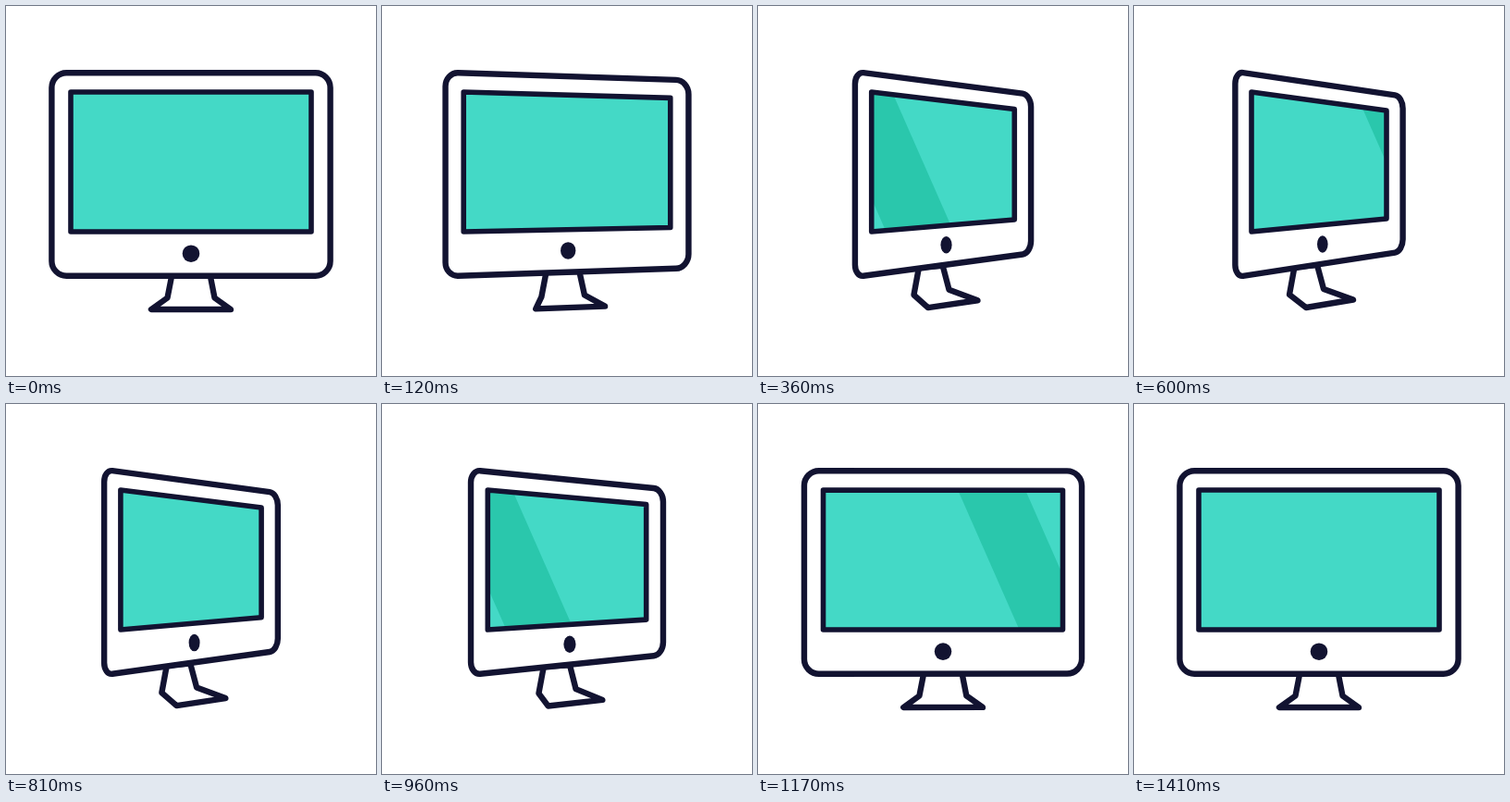
Recreate the animation shown at these times as an HTML page. Size 400 px wide and 400 px high, loop 3.62 s.

```html
<!DOCTYPE html>
<html lang="en">
<head>
<meta charset="utf-8">
<title>Turning monitor</title>
<style>
  html, body { margin: 0; width: 100%; height: 100%; overflow: hidden; background: #fff; }
  svg { display: block; width: 100%; height: 100%; }
  .line { fill: #fff; stroke: #121331; stroke-width: 6.4; stroke-linecap: round; stroke-linejoin: round; }
  #rim { fill: none; stroke-width: 5.6; }
  #glass { fill: #44d9c6; }
  .glare { fill: #2ac7ac; }
  #button { fill: #121331; }
</style>
</head>
<body>
<svg viewBox="0 0 400 400">
  <clipPath id="clip"><path id="mask"/></clipPath>
  <path id="stand" class="line"/>
  <path id="frame" class="line"/>
  <path id="glass"/>
  <g clip-path="url(#clip)">
    <path class="glare" d="M-15 60h73l88 200h-73z"/>
    <path class="glare" d="M-15 60h73l88 200h-73z"/>
  </g>
  <path id="rim" class="line"/>
  <ellipse id="button"/>
</svg>
<script>
const LOOP = 3620, STEP = 30, TURN = 600, SWEEP = 840, MID = 200;
const $ = id => document.getElementById(id);
const glares = document.querySelectorAll('.glare');

const mix = (a, b, k) => a + (b - a) * k;
const blend = (p, q, k) => p.map((v, i) => mix(v, q[i], k));
const poly = pts => 'M' + pts.join('L') + 'Z';
const set = (id, attrs) => {
  for (const name in attrs) $(id).setAttribute(name, attrs[name]);
};

// Half of the stand seen from the front, and the whole stand fully turned.
const leg = [[20.5, 290], [25.5, 315.5], [43, 328]];
const standFront = [
  ...leg.map(([x, y]) => [MID - x, y]),
  ...leg.map(([x, y]) => [MID + x, y]).reverse()
];
const standTurned = [[173.5, 282], [168, 312], [186, 326], [237, 317.5], [205, 306], [198, 280]];

// A centred panel whose sides close in while the right one shrinks.
function panel(half, top, bottom, squeeze, drop, rise, lift = 0) {
  const left = MID - half + squeeze, right = MID + half - squeeze;
  return [[left, top - lift], [right, top + drop], [right, bottom - rise], [left, bottom + lift]];
}

// Corner radii run along the level edges (rx) and the upright edges (ry).
function rounded(pts, rx, ry) {
  const toward = (a, b, r) => blend(a, b, r / Math.hypot(b[0] - a[0], b[1] - a[1]));
  return pts.map((c, i) => {
    const radii = i % 2 ? [rx, ry] : [ry, rx];
    const a = toward(c, pts[(i + 3) % 4], radii[0]);
    const b = toward(c, pts[(i + 1) % 4], radii[1]);
    return `${i ? 'L' : 'M'}${a}C${blend(a, c, 0.55)} ${blend(b, c, 0.55)} ${b}`;
  }).join('') + 'Z';
}

const smooth = s => s * s * (3 - 2 * s);

// cubic-bezier(1/3, 0, 0, 1)
function swing(x) {
  let lo = 0, hi = 1;
  for (let i = 0; i < 30; i++) {
    const s = (lo + hi) / 2;
    if (s * (1 - s) ** 2 + s ** 3 < x) lo = s; else hi = s;
  }
  return smooth(lo);
}

function sweep(t) {
  const u = Math.min(1, Math.max(0, t / SWEEP));
  return mix(-69, 335, smooth(u));
}

function draw(t) {
  const k = swing(Math.max(0, 1 - Math.abs(t - TURN) / TURN));
  const glass = poly(panel(130, 93, 244, 57 * k, 20 * k, 14 * k));
  const frame = panel(150.6, 72.2, 291.8, 60 * k, 25.5 * k, 26.5 * k, 1.3 * k);

  for (const id of ['mask', 'glass', 'rim']) set(id, { d: glass });
  set('frame', { d: rounded(frame, mix(16, 8.5, k), mix(16, 13, k)) });
  set('stand', { d: poly(standFront.map((p, i) => blend(p, standTurned[i], k))) });
  set('button', { cx: MID + 3.8 * k, cy: 267.7 - 10.2 * k, rx: 9.3 - 3.5 * k, ry: 9.3 });
  [25, 631].forEach((start, i) =>
    glares[i].setAttribute('transform', `translate(${sweep(t - start)} 0)`));
}

const begin = performance.now();
function tick() {
  const t = (performance.now() - begin) % LOOP;
  draw(Math.floor(t / STEP) * STEP);
  requestAnimationFrame(tick);
}
tick();
</script>
</body>
</html>
```
